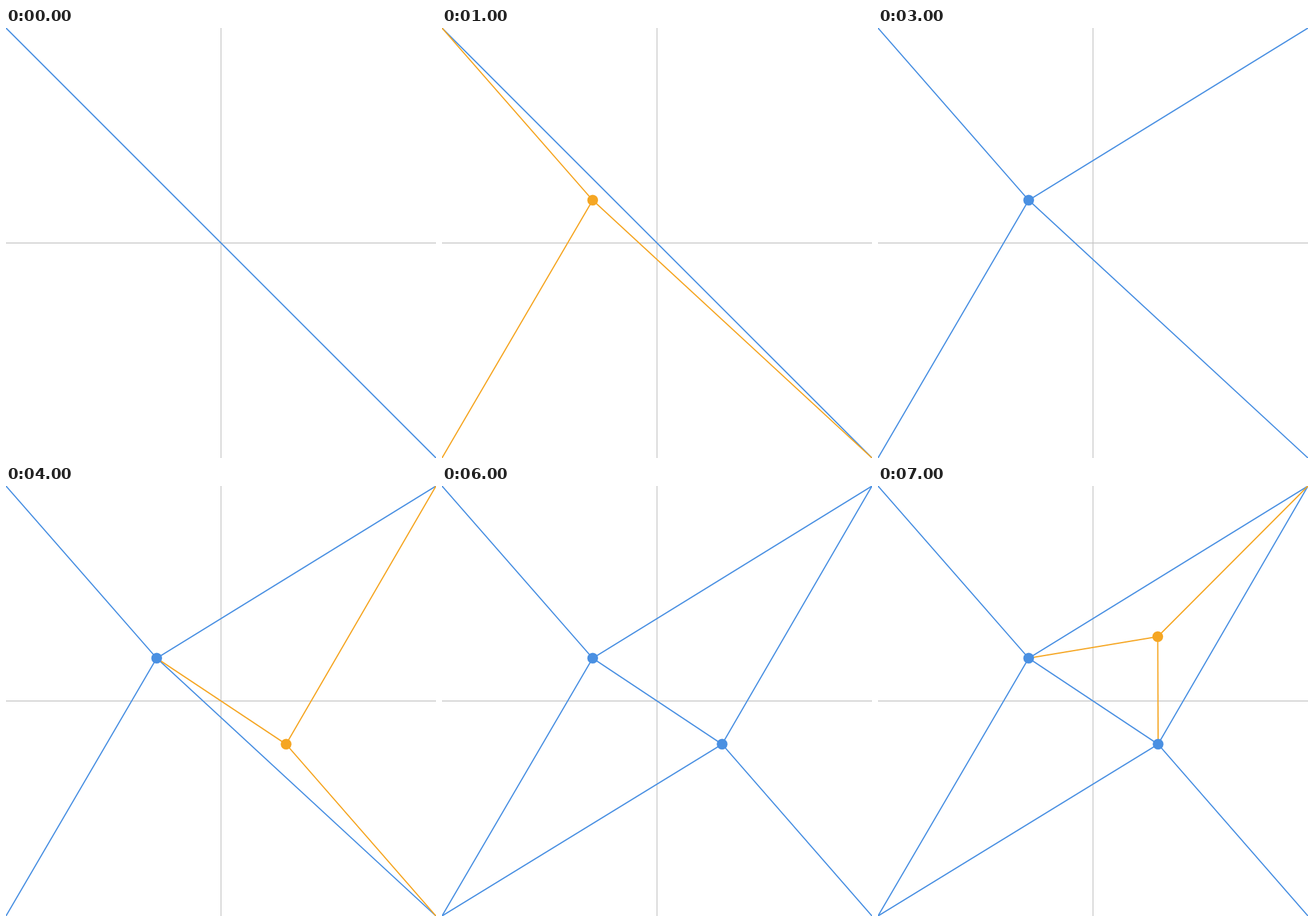
Write an HTML page with a canvas that moves like this. It is 700 px wide and 700 px high and loops after 8 s.

```html
<!DOCTYPE html>
<html>
<head>
<meta charset="utf-8">
<title>Incremental triangulation</title>
<style>
  html, body { margin: 0; width: 100%; height: 100%; overflow: hidden; background: #fff; }
  canvas { display: block; }
</style>
</head>
<body>
<canvas id="stage" width="700" height="700"></canvas>
<script>
const ctx = document.getElementById('stage').getContext('2d');
const BLUE = '#4a90e2', ORANGE = '#f5a623', GREEN = '#7ed321', GREY = '#ccc';
const STEP = 1000;

// Corners A-D, inserted points P, Q, R
const points = {
  A: [0, 0], B: [700, 0], C: [700, 700], D: [0, 700],
  P: [245.3, 280.3], Q: [456, 420.3], R: [455.4, 245.3]
};

// Each step lists edges and dots per colour, painted in order
const steps = [
  [[BLUE, 'AC']],
  [[BLUE, 'AC'], [ORANGE, 'PA PC PD', 'P']],
  [[GREY, 'AC'], [GREEN, 'PB'], [ORANGE, 'PA PC PD', 'P']],
  [[BLUE, 'PA PB PC PD', 'P']],
  [[BLUE, 'PA PB PC PD', 'P'], [ORANGE, 'QP QB QC', 'Q']],
  [[GREY, 'PC'], [BLUE, 'PA PB PD', 'P'], [GREEN, 'QD'], [ORANGE, 'QP QB QC', 'Q']],
  [[BLUE, 'PA PB PD QP QB QC QD', 'PQ']],
  [[BLUE, 'PA PB PD QP QB QC QD', 'PQ'], [ORANGE, 'RP RB RQ', 'R']]
];

function line(from, to, color, width) {
  ctx.strokeStyle = color;
  ctx.lineWidth = width;
  ctx.beginPath();
  ctx.moveTo(...from);
  ctx.lineTo(...to);
  ctx.stroke();
}

function dot(center, color) {
  ctx.fillStyle = color;
  ctx.beginPath();
  ctx.arc(...center, 8.75, 0, Math.PI * 2);
  ctx.fill();
}

function draw(groups) {
  ctx.fillStyle = '#fff';
  ctx.fillRect(0, 0, 700, 700);
  line([350, 0], [350, 700], '#c4c4c4', 1.4);
  line([0, 350], [700, 350], '#c4c4c4', 1.4);
  for (const [color, edges] of groups)
    for (const [a, b] of edges.split(' ')) line(points[a], points[b], color, 2);
  for (const [color, , dots = ''] of groups)
    for (const name of dots) dot(points[name], color);
}

function frame() {
  draw(steps[Math.floor(performance.now() / STEP) % steps.length]);
  requestAnimationFrame(frame);
}
frame();
</script>
</body>
</html>
```
